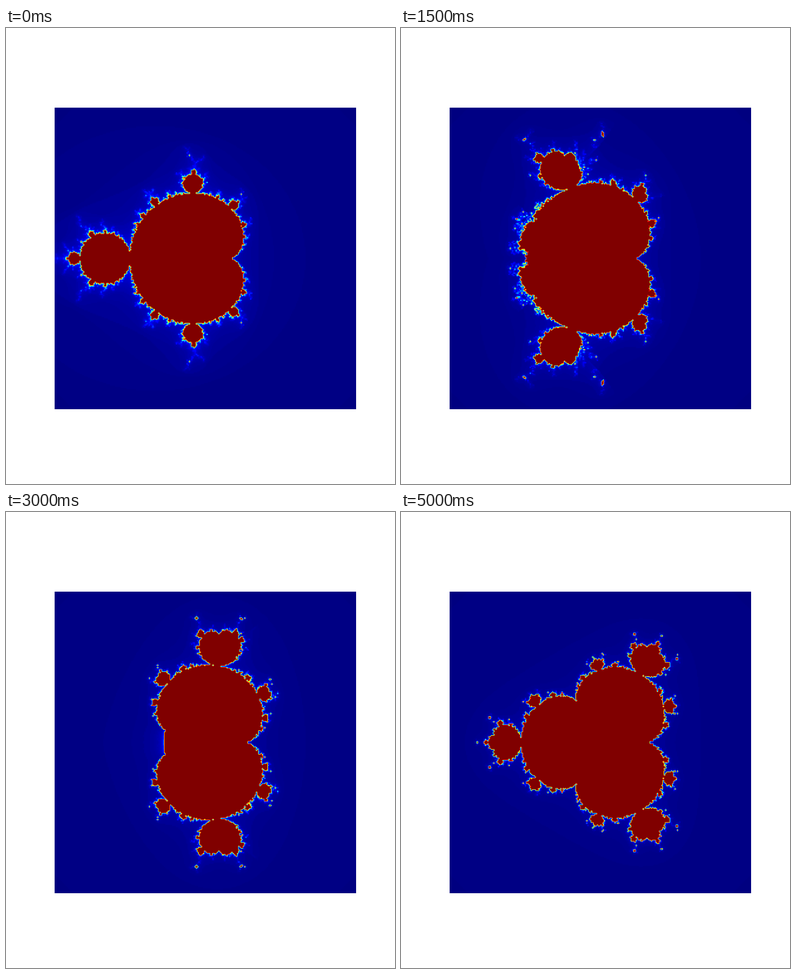
Write an HTML page with a canvas that moves like this. It is 640 px wide and 750 px high and loops after 5500 ms.

```html
<!DOCTYPE html>
<html lang="en">
<head>
<meta charset="utf-8">
<title>Multibrot powers</title>
<style>
  html, body { margin: 0; width: 100%; height: 100%; overflow: hidden; background: #fff; }
  canvas { position: absolute; left: 80px; top: 131px; }
</style>
</head>
<body>
<canvas id="plot" width="496" height="496"></canvas>
<script>
const SIZE = 496, GRID = 256, LIMIT = 200, STEPS = 11, HOLD = 500;
const ctx = document.getElementById('plot').getContext('2d');

// Piecewise linear curve through [x, y] points.
function ramp(points, x) {
  for (let i = 1; i < points.length; i++) {
    const [x0, y0] = points[i - 1], [x1, y1] = points[i];
    if (x <= x1) return y0 + (y1 - y0) * (x - x0) / (x1 - x0);
  }
  return points[points.length - 1][1];
}

const RED = [[0, 0], [.35, 0], [.66, 1], [.89, 1], [1, .5]];
const GREEN = [[0, 0], [.125, 0], [.375, 1], [.64, 1], [.91, 0], [1, 0]];
const BLUE = [[0, .5], [.11, 1], [.34, 1], [.65, 0], [1, 0]];
const jet = Array.from({ length: 256 }, (_, i) =>
  [RED, GREEN, BLUE].map(curve => Math.round(255 * ramp(curve, i / 255))));

// Iterations of z -> z^p + c before |z| exceeds 2.
function escapeCount(cx, cy, p) {
  let x = cx, y = cy, savedX = 0, savedY = 0, nextSave = 8;
  for (let n = 0; n < LIMIT; n++) {
    const r2 = x * x + y * y;
    if (r2 > 4) return n;
    const r = Math.exp(p / 2 * Math.log(r2)), a = p * Math.atan2(y, x);
    x = r * Math.cos(a) + cx;
    y = r * Math.sin(a) + cy;
    // A repeated orbit never escapes.
    if (Math.abs(x - savedX) + Math.abs(y - savedY) < 1e-11) return LIMIT;
    if (n === nextSave) {
      savedX = x;
      savedY = y;
      nextSave *= 2;
    }
  }
  return LIMIT;
}

function sampleGrid(p) {
  const grid = new Float32Array(GRID * GRID);
  const coord = i => -1.5 + 3 * i / (GRID - 1);
  for (let j = 0; j < GRID / 2; j++) {
    for (let i = 0; i < GRID; i++) {
      const v = escapeCount(coord(i), coord(j), p) / LIMIT;
      grid[j * GRID + i] = grid[(GRID - 1 - j) * GRID + i] = v;
    }
  }
  return grid;
}

// Neighbouring cells and cosine blend weight for each screen pixel.
const taps = Array.from({ length: SIZE }, (_, i) => {
  const u = (i + .5) * GRID / SIZE - .5, base = Math.floor(u);
  return {
    a: Math.max(base, 0),
    b: Math.min(base + 1, GRID - 1),
    w: .5 - .5 * Math.cos(Math.PI * (u - base))
  };
});

function render(p) {
  const grid = sampleGrid(p), image = ctx.createImageData(SIZE, SIZE);
  let k = 0;
  for (const row of taps) {
    const top = row.a * GRID, bottom = row.b * GRID;
    for (const { a, b, w } of taps) {
      const v0 = grid[top + a] * (1 - w) + grid[top + b] * w;
      const v1 = grid[bottom + a] * (1 - w) + grid[bottom + b] * w;
      const v = v0 * (1 - row.w) + v1 * row.w;
      const color = jet[Math.min(255, Math.floor(v * 256 + 1e-4))];
      image.data[k++] = color[0];
      image.data[k++] = color[1];
      image.data[k++] = color[2];
      image.data[k++] = 255;
    }
  }
  return image;
}

const images = Array.from({ length: STEPS }, (_, i) => render(2 + i / 5));
let shown = -1;

function draw() {
  const step = Math.floor(performance.now() / HOLD) % STEPS;
  if (step !== shown) {
    ctx.putImageData(images[step], 0, 0);
    shown = step;
  }
  requestAnimationFrame(draw);
}
draw();
</script>
</body>
</html>
```
